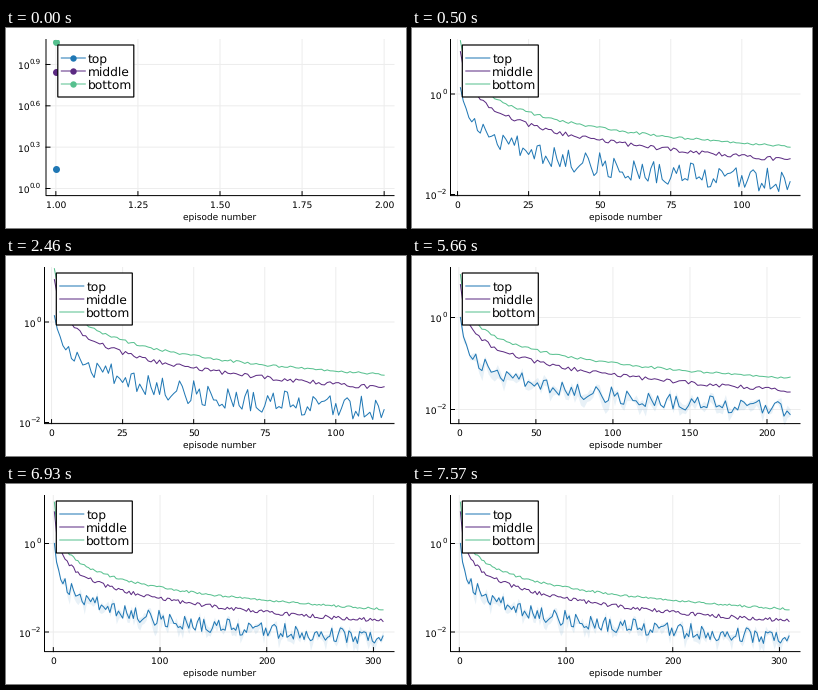
A matplotlib script for the animation above (8 s loop, 400 px wide and 200 px high).

```python
import numpy as np
import matplotlib.pyplot as plt
from matplotlib.animation import FuncAnimation
from matplotlib.patches import Rectangle

W, H, DPI = 400, 200, 100
PT = 72 / DPI                      # points per pixel
STEP, LOOP = 20, 8000              # ms
CHANGES = [500, 3760, 6930]        # ms at which the plot is redrawn
TOP, BOTTOM, RIGHT = 11.5, 167.6, 388
TICK_PX, LABEL_PX, LEGEND_PX = 9.2, 9, 12.3

# Each curve is a noisy power law: log10(y) = start - slope * log10(episode)
CURVES = {
    "top": dict(color="#1f77b4", start=0.138, slope=0.91, noise=0.24),
    "middle": dict(color="#5b2a82", start=0.845, slope=1.04, noise=0.045),
    "bottom": dict(color="#56c08e", start=1.06, slope=1.02, noise=0.025),
}

plt.rcParams.update({"font.family": "DejaVu Sans", "text.hinting": "none",
                     "toolbar": "None"})
fig = plt.figure(figsize=(W / DPI, H / DPI), dpi=DPI, facecolor="white")
ax = fig.add_axes([0, 0, 1, 1])
ax.set(xlim=(0, W), ylim=(H, 0))
ax.axis("off")


class View:
    """One state of the plot; maps episodes and log10 values to pixels."""

    def __init__(self, left, last, zero, decade):
        self.left, self.last = left, last
        self.zero, self.decade = zero, decade
        self.art = []

    def x(self, ep):
        span = self.last - 1
        start = 1 - 0.03 * span
        return self.left + (ep - start) * (RIGHT - self.left) / (1.06 * span)

    def y(self, log):
        return self.zero - log * self.decade

    def line(self, xs, ys, color="black", z=3, **kw):
        self.art += ax.plot(xs, ys, color=color, lw=PT, zorder=z,
                            snap=False, **kw)
        return self.art[-1]

    def text(self, x, y, s, px, ha="center"):
        self.art.append(ax.text(x, y, s, fontsize=px * PT, ha=ha,
                                va="baseline", zorder=8))

    def clip(self, artist):
        artist.set_clip_path(Rectangle((self.left, TOP), RIGHT - self.left,
                                       BOTTOM - TOP, transform=ax.transData))

    def power_label(self, y, exponent):
        em = {".": .318, "\u2212": .838}
        small = 7
        x = 34.5 - small * sum(em.get(c, .636) for c in exponent)
        self.text(x, y + 4.5, "10", TICK_PX, "right")
        self.text(x, y - 0.3, exponent, small, "left")

    def axes(self, xticks, xlabels, powers):
        for ep, label in zip(xticks, xlabels):
            x = self.x(ep)
            self.line([x, x], [TOP, BOTTOM], "#ededed", z=1)
            self.line([x, x], [BOTTOM, BOTTOM - 4], z=4)
            self.text(x, 180.2, label, TICK_PX)
        for power in powers:
            y = self.y(power)
            self.line([self.left, RIGHT], [y, y], "#ededed", z=1)
            self.line([self.left, self.left + 4], [y, y], z=4)
            self.power_label(y, f"{power}".replace("-", "\u2212"))
        self.line([self.left, self.left, RIGHT], [TOP, BOTTOM, BOTTOM], z=4)
        self.text((self.left + RIGHT) / 2, 191.7, "episode number", LABEL_PX)

    def legend(self, dots=False):
        x = self.left + 11.8
        box = Rectangle((x, 17), 76, 52, fc="white", ec="black",
                        lw=1.2 * PT, zorder=6, snap=False)
        self.art.append(ax.add_patch(box))
        for row, (name, curve) in enumerate(CURVES.items()):
            y = 30 + 13 * row
            self.line([x + 3.5, x + 27.5], [y, y], curve["color"], z=7)
            if dots:
                self.line([x + 15.5], [y], curve["color"], z=7, marker="o",
                          ms=6.4 * PT, mew=0)
            self.text(x + 30, y + 4.4, name, LEGEND_PX, "left")

    def curves(self, averaged):
        """Averaged curves start lower, are calmer and show their spread."""
        ep = np.arange(1, self.last + 1, 2 if averaged else 1)
        for seed, curve in enumerate(CURVES.values()):
            rng = np.random.default_rng(seed + 11)
            log = curve["start"] - curve["slope"] * np.log10(ep)
            noise = curve["noise"] * np.minimum(1, ep / 15)
            if averaged:
                log = log - 0.13 * np.exp(-ep / 40)
                if seed == 0:
                    noise = noise * 0.75
            log = log + noise * rng.uniform(-1, 1, len(ep))
            self.clip(self.line(self.x(ep), self.y(log), curve["color"]))
            if averaged and seed == 0:
                self.ribbon(ep, log, curve["color"])

    def ribbon(self, ep, log, color):
        low, high = np.random.default_rng(5).random((len(ep), 2)).T
        band = ax.fill_between(self.x(ep), self.y(log - 0.24 * low),
                               self.y(log + 0.14 * high),
                               color=color, alpha=0.1, lw=0, zorder=2)
        self.clip(band)
        self.art.append(band)


def first_view():
    view = View(40, 2, 160.5, 137.8)
    ticks = np.linspace(1, 2, 5)
    view.axes(ticks, [f"{t:.2f}" for t in ticks], [0.0, 0.3, 0.6, 0.9])
    for curve in CURVES.values():
        view.clip(view.line([view.x(1)], [view.y(curve["start"])],
                            curve["color"], marker="o", ms=7 * PT, mew=0))
    view.legend(dots=True)
    return view


def run_view(last, zero, decade, tick, averaged=True):
    view = View(38.5, last, zero, decade)
    ticks = range(0, last, tick)
    view.axes(ticks, map(str, ticks), [0, -2])
    view.curves(averaged)
    view.legend()
    return view


views = [first_view(),
         run_view(117, 66, 50.25, 25, averaged=False),
         run_view(215, 61.5, 46, 50),
         run_view(310, 59.5, 44.25, 100)]


def update(i):
    shown = np.searchsorted(CHANGES, (i + 0.5) * STEP, side="right")
    for k, view in enumerate(views):
        for artist in view.art:
            artist.set_visible(k == shown)
    return []


anim = FuncAnimation(fig, update, frames=LOOP // STEP, interval=STEP,
                     repeat=True, repeat_delay=0, blit=False)
plt.show()
```
